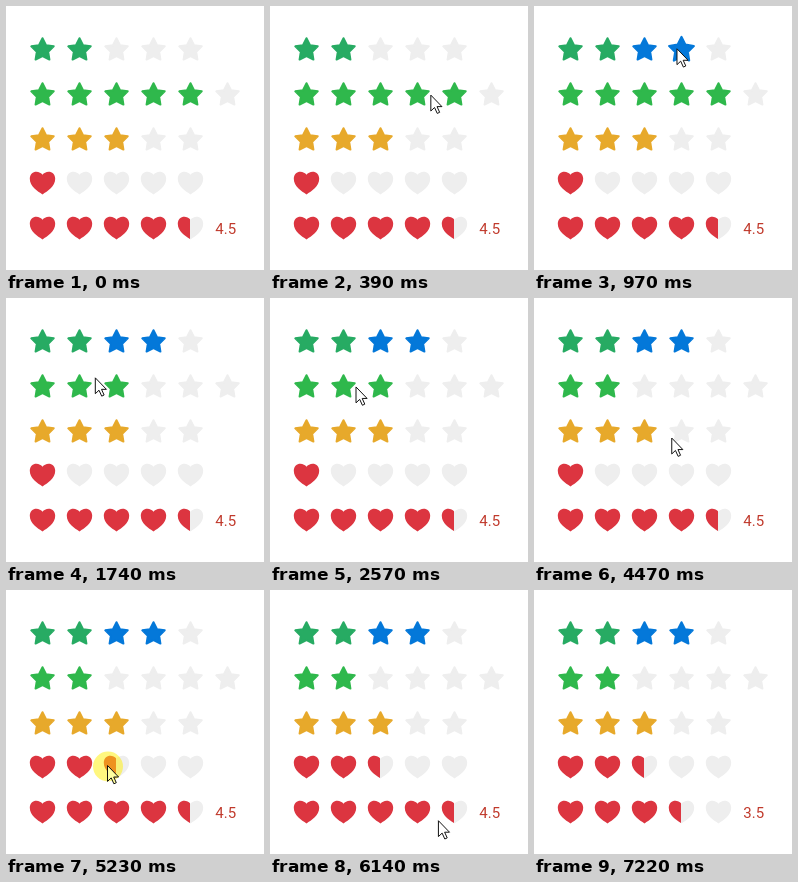
Write an HTML page with a canvas that moves like this. It is 258 px wide and 264 px high and loops after 7470 ms.

```html
<!DOCTYPE html>
<html lang="en">
<head>
<meta charset="utf-8">
<title>Rating controls</title>
<style>
  html, body { margin: 0; overflow: hidden; background: #fff; }
  canvas { display: block; }
</style>
</head>
<body>
<canvas id="stage" width="258" height="264"></canvas>
<script>
const ctx = document.getElementById('stage').getContext('2d');
const LOOP = 7470;
const PITCH = 37, ROW_HEIGHT = 45;
const EMPTY = '#eeeeee', GREEN = '#2fb84c', TEAL = '#27ab63', BLUE = '#0478d9', GOLD = '#e7a92b', RED = '#dc3540';

const halfHeart = side => `M0 9.4C${5 * side} 6.2 ${12.7 * side} 1.5 ${12.7 * side} -6.2` +
  `C${12.7 * side} -10.8 ${9.5 * side} -13.3 ${6.2 * side} -13.3C${3.6 * side} -13.3 ${1.2 * side} -12 0 -10.2Z`;
const heart = new Path2D(halfHeart(-1) + halfHeart(1));
const arrow = new Path2D('M.5 .5V16.4L4.2 12.9L6.9 18.8L9.3 17.7L6.7 12H11.6Z');

const star = new Path2D();
for (let i = 0; i < 10; i++) {
  const radius = i % 2 ? 6 : 11.8, angle = i * Math.PI / 5;
  star.lineTo(radius * Math.sin(angle), -radius * Math.cos(angle));
}
star.closePath();

// Each rating is a step function of time
const rows = [
  { count: 5, shape: star, grows: true, color: i => i < 2 ? TEAL : BLUE, rating: t => t < 520 ? 2 : 4 },
  { count: 6, shape: star, grows: true, color: () => GREEN, rating: t => t < 1700 ? 5 : t < 2630 ? 3 : 2 },
  { count: 5, shape: star, color: () => GOLD, rating: () => 3 },
  { count: 5, shape: heart, color: () => RED, rating: t => t < 4850 ? 1 : 2.5 },
  { count: 5, shape: heart, grows: true, color: () => RED, rating: t => t < 6530 ? 4.5 : 3.5 },
];

// The pointer eases from stop to stop
const entry = { x: 188, y: 180 };
const stops = [
  { start: 0, end: 650, x: 147, y: 41 },
  { start: 870, end: 1550, x: 88, y: 79 },
  { start: 1600, end: 2250, x: 103, y: 90 },
  { start: 2435, end: 2690, x: 73, y: 89 },
  { start: 3100, end: 3580, x: 125, y: 133 },
  { start: 3640, end: 4020, x: 146, y: 133 },
  { start: 4260, end: 5050, x: 102, y: 176 },
  { start: 5410, end: 6000, x: 174, y: 233 },
  { start: 6080, end: 6330, x: 140, y: 221 },
  { start: 6970, end: 7220, x: 168, y: 268 },
];
const clicks = [830, 2880, 5230, 6530];
const CLICK_LENGTH = 75;

const clamp = v => Math.max(0, Math.min(1, v));
const ease = p => p * p * (3 - 2 * p);

function pointerAt(time) {
  let { x, y } = entry;
  for (const stop of stops) {
    const p = ease(clamp((time - stop.start) / (stop.end - stop.start)));
    x += (stop.x - x) * p;
    y += (stop.y - y) * p;
  }
  return { x, y };
}

function drawIcon(row, x, y, filled, color, pointer) {
  const paint = fill => {
    ctx.fillStyle = ctx.strokeStyle = fill;
    ctx.fill(row.shape);
    if (row.shape === star) ctx.stroke(star);
  };
  ctx.save();
  ctx.translate(x, y);
  if (row.grows && pointer && Math.hypot(pointer.x - x, pointer.y - y) < 11) ctx.scale(1.1, 1.1);
  ctx.lineWidth = 2;
  ctx.lineJoin = 'round';
  if (filled < 1) paint(EMPTY);
  if (filled > 0) {
    ctx.beginPath();
    ctx.rect(-14.5, -16, 29 * filled - (filled < 1 ? 0.5 : 0), 32);
    ctx.clip();
    paint(color);
  }
  ctx.restore();
}

function drawPointer({ x, y }, pressed) {
  ctx.save();
  ctx.translate(x - 1, y - 1);
  if (pressed) {
    ctx.fillStyle = 'rgba(255, 240, 0, .5)';
    ctx.beginPath();
    ctx.arc(1, 1.5, 15, 0, 2 * Math.PI);
    ctx.fill();
  }
  ctx.fillStyle = pressed ? '#ffffa0' : '#fff';
  ctx.strokeStyle = '#111';
  ctx.fill(arrow);
  ctx.stroke(arrow);
  ctx.restore();
}

function draw(time) {
  const pointer = time >= 60 && time < 7220 ? pointerAt(time) : null;
  ctx.fillStyle = '#fff';
  ctx.fillRect(0, 0, 258, 264);
  rows.forEach((row, r) => {
    for (let i = 0; i < row.count; i++) {
      const filled = clamp(row.rating(time) - i);
      drawIcon(row, 36.5 + PITCH * i, 44 + ROW_HEIGHT * r, filled, row.color(i), pointer);
    }
  });
  ctx.fillStyle = '#c0392b';
  ctx.font = '15px Roboto, sans-serif';
  ctx.fillText(rows[4].rating(time).toFixed(1), 209.3, 228);
  if (pointer) drawPointer(pointer, clicks.some(at => time >= at && time < at + CLICK_LENGTH));
}

const began = performance.now();
function tick() {
  draw((performance.now() - began) % LOOP);
  requestAnimationFrame(tick);
}
tick();
</script>
</body>
</html>
```
